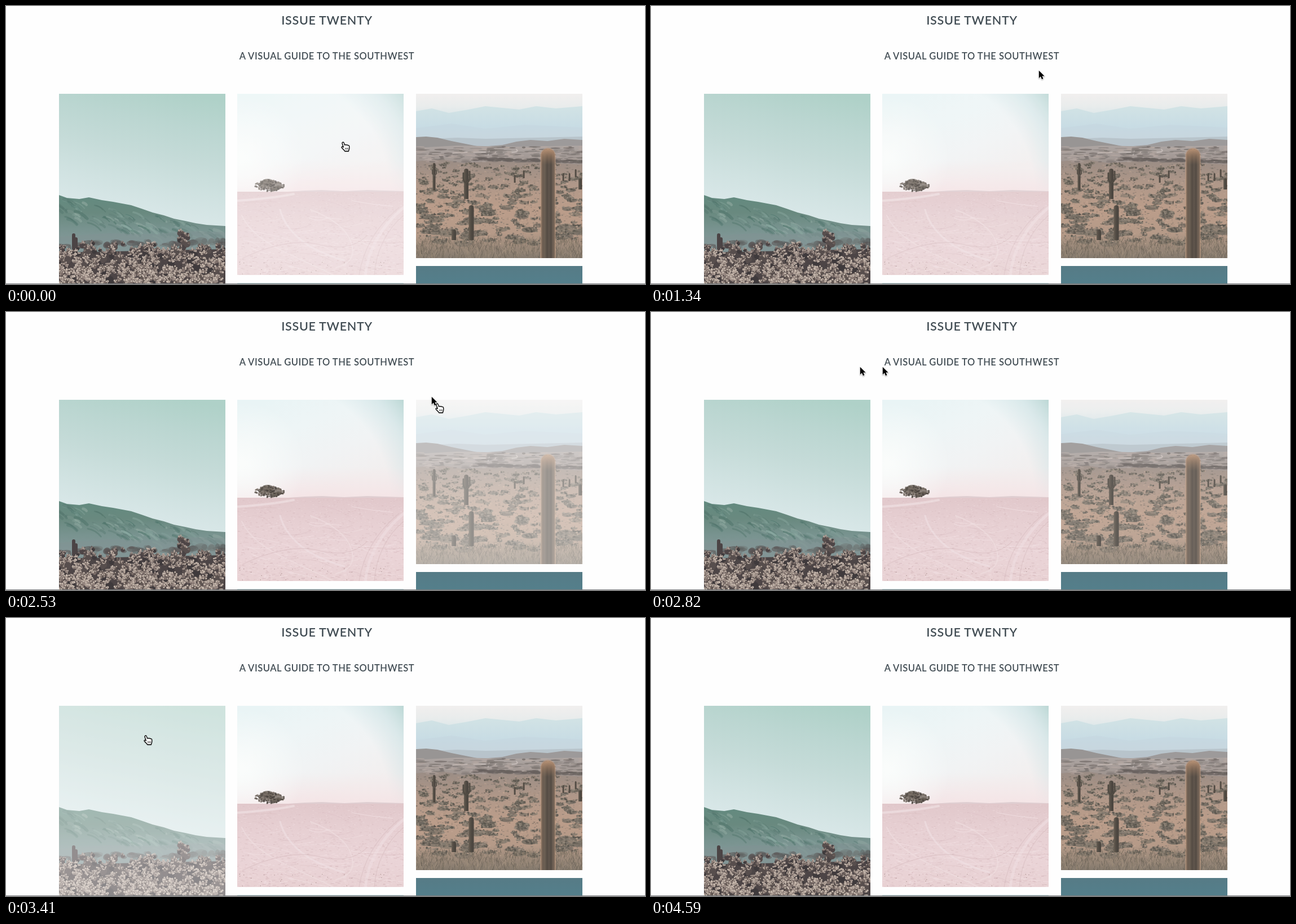
An HTML page with a canvas that plays this animation: 1133x494 px, repeating every 5.25 s.

```html
<!DOCTYPE html>
<html lang="en">
<head>
<meta charset="utf-8">
<title>Issue Twenty</title>
<style>
html, body { margin: 0; width: 100%; height: 100%; overflow: hidden; background: #fefefe; }
canvas { position: absolute; left: 0; top: 0; display: block; width: 100%; height: 100%; }
h1, h2 {
  position: absolute; left: 5px; right: 0; margin: 0; text-align: center; white-space: nowrap;
  font-family: Lato, "Open Sans", sans-serif; font-weight: 600; color: #424d54;
}
h1 { top: 11px; font-size: 21.5px; line-height: 28px; letter-spacing: .7px; }
h2 { top: 78px; font-size: 16.5px; line-height: 23px; letter-spacing: .52px; }
</style>
</head>
<body>
<h1>ISSUE TWENTY</h1>
<h2>A VISUAL GUIDE TO THE SOUTHWEST</h2>
<canvas id="stage" width="1133" height="494"></canvas>
<script>
const LOOP = 5250;
const stage = document.getElementById('stage').getContext('2d');

function seeded(seed) {
  return () => {
    seed = (seed + 0x6D2B79F5) | 0;
    let v = Math.imul(seed ^ (seed >>> 15), 1 | seed);
    v = (v + Math.imul(v ^ (v >>> 7), 61 | v)) ^ v;
    return ((v ^ (v >>> 14)) >>> 0) / 4294967296;
  };
}

// Scenes are painted once, in stage coordinates.
function scene(x, y, w, h, paint, seed) {
  const cv = document.createElement('canvas');
  cv.width = w;
  cv.height = h;
  const c = cv.getContext('2d');
  c.translate(-x, -y);
  c.lineCap = 'round';
  c.lineJoin = 'round';
  paint(c, seeded(seed), x, y, w, h);
  return { cv, x, y };
}

function shade(c, x0, y0, x1, y1, ...colors) {
  const g = c.createLinearGradient(x0, y0, x1, y1);
  colors.forEach((col, i) => g.addColorStop(i / (colors.length - 1), col));
  return g;
}

function glow(c, x, y, r0, r1, ...colors) {
  const g = c.createRadialGradient(x, y, r0, x, y, r1);
  colors.forEach((col, i) => g.addColorStop(i / (colors.length - 1), col));
  return g;
}

function land(c, pts, bottom, fill) {
  c.beginPath();
  c.moveTo(pts[0], bottom);
  for (let i = 0; i < pts.length; i += 2) c.lineTo(pts[i], pts[i + 1]);
  c.lineTo(pts[pts.length - 2], bottom);
  c.fillStyle = fill;
  c.fill();
}

function line(c, path, color, width) {
  c.strokeStyle = color;
  c.lineWidth = width;
  c.stroke(new Path2D(path));
}

function blob(c, x, y, rx, ry, color) {
  c.fillStyle = color;
  c.beginPath();
  c.ellipse(x, y, rx, ry, 0, 0, 7);
  c.fill();
}

function pick(rnd, list) { return list[Math.floor(rnd() * list.length)]; }

// A bristly clump: dark heart, short pale arms.
function cholla(c, rnd, x, y, r) {
  blob(c, x, y + r * .6, r * 1.1, r, pick(rnd, ['#3f3a3c', '#4d4546', '#574e4d']));
  for (let i = 0; i < 7; i++) {
    const a = -Math.PI * (rnd() * 1.2 - .1), d = r * (.5 + rnd() * .6);
    const px = Math.cos(a) * d, py = Math.sin(a) * d;
    const color = pick(rnd, ['#615652', '#7d6f6a', '#968780', '#b3a49a']);
    line(c, `M${x + px * .55} ${y + py * .55}L${x + px} ${y + py}`, color, Math.max(1, r * .38));
    if (r > 6) blob(c, x + px, y + py, r * .13, r * .13, '#cbbeb2');
  }
}

function chollaField(c, rnd, x, y, w, h) {
  c.fillStyle = shade(c, 320, 156, 275, 385, '#afd1c8', '#bbd6d1', '#c5dbd8', '#d0e2e1', '#dae8e9');
  c.fillRect(x, y, w, h);
  land(c, [94, 336, 108, 341, 130, 343, 147, 340, 170, 345, 190, 348, 206, 351, 222, 354, 240, 360,
    260, 367, 280, 372, 298, 378, 318, 382, 336, 386, 356, 389, 389, 391], 440,
  shade(c, 0, 338, 0, 425, '#638a7f', '#69897f', '#78938f', '#86999a'));
  c.save();
  c.clip(new Path2D('M94 338 147 342 206 353 240 362 298 380 356 391 389 393V425H94Z'));
  for (let i = 0; i < 110; i++) {
    const px = 84 + rnd() * 290, py = 340 + Math.max(0, px - 94) * .19 + rnd() * 38;
    const l = 6 + rnd() * 18;
    c.globalAlpha = .2 + rnd() * .25;
    line(c, `M${px} ${py}q${l * .6} ${l * .1} ${l} ${l * .6}`, pick(rnd, ['#456d63', '#4f7169', '#8fada4', '#a0b5ad']), 1.5 + rnd() * 4);
  }
  c.restore();
  land(c, [94, 410, 180, 404, 260, 406, 320, 400, 389, 402], 440, 'rgba(128,147,147,.6)');
  for (let i = 0; i < 70; i++) {
    const px = x + rnd() * w;
    c.globalAlpha = .5;
    blob(c, px, 421 - (px - 94) * .02 + rnd() * 9, 3 + rnd() * 8, 2 + rnd() * 4, pick(rnd, ['#5c605f', '#6f7775', '#554e4e']));
  }
  c.globalAlpha = 1;
  land(c, [94, 438, 389, 432], 493, '#4c4546');
  for (let i = 0; i < 330; i++) {
    const k = i / 330;
    cholla(c, rnd, x + rnd() * w, 419 + k * 76 + rnd() * 9, 2.5 + k * 7 + rnd() * 3.5);
    if (i === 90) {
      line(c, 'M120 407v24M124 414v13M315 404v28M309 408l4 10M322 406l-5 10', '#4b4445', 6);
      for (let j = 0; j < 6; j++) cholla(c, rnd, 315 + (j % 3 - 1) * 6, 401 + j * 4, 5);
    }
  }
}

function pinkFlat(c, rnd, x, y, w, h) {
  c.fillStyle = shade(c, 470, 156, 540, 330, '#e9f4f5', '#eef5f6', '#f1f3f4', '#f2efef');
  c.fillRect(x, y, w, 175);
  c.fillStyle = glow(c, 480, 330, 200, 292, 'rgba(205,226,228,0)', 'rgba(205,226,228,.6)', '#b4d3cf');
  c.fillRect(x, y, w, 175);
  c.fillStyle = shade(c, 0, 275, 0, 330, 'rgba(246,228,229,0)', 'rgba(245,226,228,.8)');
  c.fillRect(x, 275, w, 56);
  c.fillStyle = glow(c, 420, 270, 5, 110, '#fafcfb', 'rgba(250,252,251,0)');
  c.fillRect(x, 156, 125, 175);
  land(c, [500, 330, 530, 328, 560, 327, 600, 329, 640, 327, 705, 329], 332, '#dfced1');
  c.fillStyle = shade(c, 0, 330, 0, 478, '#e1c8cb', '#e7d0d3', '#ead4d7', '#e8d1d3');
  c.fillRect(x, 330, w, 148);
  for (let i = 0; i < 1900; i++) {
    const k = rnd(), l = 1 + rnd() * (2 + 4 * k);
    c.globalAlpha = .25 + rnd() * .4;
    c.fillStyle = pick(rnd, ['#d0b2b6', '#d9bfc2', '#f1e1e3', '#f0dcdf']);
    c.fillRect(x + rnd() * w, 331 + 147 * k, l, .7 + k * .8);
  }
  for (let i = 0; i < 34; i++) {
    const px = x + rnd() * w, py = 345 + rnd() * 120, l = 25 + rnd() * 55;
    c.globalAlpha = .3 + rnd() * .25;
    line(c, `M${px} ${py}q${l * .5} ${rnd() * 12 - 3} ${l} ${rnd() * 26 - 8}`, pick(rnd, ['#f3e4e6', '#d9bdc1']), 1.2);
  }
  c.globalAlpha = .6;
  line(c, 'M410 346Q470 342 510 334', '#f2e5e6', 4);
  line(c, 'M486 362Q494 392 522 415T600 452', '#f1e2e4', 3);
  line(c, 'M637 478C643 430 667 390 705 358', '#f1e0e3', 5);
  line(c, 'M653 478C656 436 674 398 705 372M626 478C634 432 654 394 697 358', '#d8bcc0', 1.2);
  line(c, 'M418 372Q435 410 500 440T580 478M540 362Q600 385 612 420T585 465', '#f0dfe2', 2);
  line(c, 'M420 448Q500 410 555 424T640 408', '#d9bec1', 1.3);
  c.globalAlpha = 1;
  for (let i = 0; i < 26; i++) blob(c, x + rnd() * w, 455 + rnd() * 22, .8, .6, '#a98f8e');
  line(c, 'M463 330l3-9M470 330v-8M475 328l3-6', '#5f554f', 1.6);
  c.globalAlpha = .75;
  blob(c, 468, 318, 21, 8, '#6a6057');
  blob(c, 464, 313, 11, 6, '#6a6057');
  for (let i = 0; i < 150; i++) {
    const a = rnd() * 7, r = Math.sqrt(rnd());
    blob(c, 467 + Math.cos(a) * r * 26, 319 + Math.sin(a) * r * 10, 1.8, 1.3, pick(rnd, ['#57504a', '#6b6158', '#80766d', '#48423d']));
  }
  c.globalAlpha = 1;
}

function column(x, top, bottom, w) {
  const r = w / 2;
  return new Path2D(`M${x - r} ${bottom}V${top + r}A${r} ${r} 0 0 1 ${x + r} ${top + r}V${bottom}Z`);
}

function trunk(c, x, top, bottom, w) {
  c.fillStyle = shade(c, x - w / 2, 0, x + w / 2, 0, '#685e53', '#4f4942', '#4a443e');
  c.fill(column(x, top, bottom, w));
}

function shrub(c, rnd, x, y, r) {
  blob(c, x, y, r, r * .36, pick(rnd, ['#69645c', '#756e64', '#7f766b']));
  for (let i = 0; i < 4 + r; i++) {
    const px = x + (rnd() * 2 - 1) * r, py = y - (rnd() - .35) * r * .7;
    blob(c, px, py, 1 + rnd() * r * .15, .8 + rnd(), pick(rnd, ['#56524b', '#645f56', '#857c70', '#9a8d7f']));
  }
}

function saguaroValley(c, rnd, x, y, w, h) {
  c.fillStyle = shade(c, 0, 156, 0, 245, '#f1efee', '#e9ecec', '#d6e5e8', '#cbdde6', '#ccd9df');
  c.fillRect(x, y, w, h);
  land(c, [727, 187, 755, 182, 785, 190, 820, 184, 850, 178, 880, 181, 910, 184, 940, 178, 975, 182, 1022, 178], 250,
    shade(c, 0, 178, 0, 250, '#d2e3e5', '#c8dce4', '#cbd5da'));
  land(c, [727, 217, 790, 209, 850, 218, 920, 211, 1022, 216], 255, 'rgba(198,214,223,.5)');
  land(c, [727, 237, 800, 234, 850, 236, 1022, 232], 260, 'rgba(178,189,195,.7)');
  land(c, [727, 233, 745, 232, 765, 234, 790, 240, 815, 245, 845, 251], 275, '#989594');
  land(c, [830, 251, 880, 247, 905, 241, 930, 238, 960, 240, 990, 236, 1022, 238], 275, '#9d9a9a');
  land(c, [727, 252, 800, 248, 900, 250, 1022, 248], 300, shade(c, 0, 250, 0, 285, '#aca4a1', '#9b908b'));
  line(c, 'M770 266Q800 258 858 260T905 255', '#c5bcb8', 2);
  line(c, 'M857 257l-2 7', '#e1d9d5', 2);
  land(c, [727, 276, 770, 272, 810, 279, 860, 276, 940, 277, 1022, 282], 448,
    shade(c, 0, 275, 0, 447, '#9b8d85', '#b09889', '#bb9d8a', '#b59a88', '#857a6e'));
  for (let i = 0; i < 190; i++) {
    const px = x + rnd() * w;
    c.globalAlpha = .4 + rnd() * .4;
    blob(c, px, 250 + rnd() * 27, 3 + rnd() * 9, .8 + rnd(), pick(rnd, ['#827b77', '#736c69', '#b5a8a2']));
    if (px > 830) blob(c, px, 269 + (px - 830) * .025 + rnd() * 5, 6, 1.5, '#69625f');
  }
  for (let i = 0; i < 260; i++) {
    const k = i / 260, px = x + rnd() * w;
    c.globalAlpha = .6 + rnd() * .3;
    shrub(c, rnd, px, 278 + k * 140 + rnd() * 5, 3 + rnd() * (3 + k * 12));
  }
  for (let i = 0; i < 1300; i++) {
    c.fillStyle = pick(rnd, ['#5f5a52', '#77706a', '#caab97', '#a48c7d']);
    c.globalAlpha = .5;
    c.fillRect(x + rnd() * w, 280 + 142 * rnd(), 1 + rnd() * 3, 1 + rnd());
  }
  for (let i = 0; i < 1100; i++) {
    const px = x + rnd() * w, py = 417 + rnd() * 34;
    c.globalAlpha = .5;
    line(c, `M${px} ${py}l${rnd() * 8 - 4} ${-3 - rnd() * 7}`, pick(rnd, ['#5f594f', '#70685d', '#8d806f', '#a89581']), 1);
  }
  c.globalAlpha = 1;
  trunk(c, 816, 289, 343, 8);
  line(c, 'M811 297v10q1 6 5 7M822 294v13q-1 6-6 7', '#514b43', 3);
  trunk(c, 759, 279, 328, 5);
  line(c, 'M756 291v7l3 3M763 292v6l-4 4', '#5b544c', 2);
  trunk(c, 825, 354, 416, 9);
  trunk(c, 794, 397, 416, 8);
  for (const [px, top] of [[902, 300], [918, 292], [988, 297], [999, 297], [1010, 290]]) trunk(c, px, top, top + 14, 3);
  trunk(c, 1018, 306, 326, 6);

  c.fillStyle = 'rgba(186,150,124,.7)';
  c.fill(column(961, 252, 450, 27));
  const body = column(961, 254, 450, 24);
  c.fillStyle = shade(c, 949, 0, 973, 0, '#85705f', '#665b50', '#584f47', '#5a5149', '#7d6a5b');
  c.fill(body);
  c.globalAlpha = .4;
  for (let i = 0; i < 6; i++) line(c, `M${952 + i * 3.6} 264V450`, i % 2 ? '#7d6e60' : '#463f38', 1);
  c.globalAlpha = 1;
  c.fillStyle = shade(c, 0, 253, 0, 282, '#bd9678', 'rgba(166,130,103,.5)', 'rgba(150,120,95,0)');
  c.fill(body);
}

function seaTop(c, rnd, x, y, w, h) {
  c.fillStyle = shade(c, 0, y, 0, y + h, '#567b86', '#547f8b');
  c.fillRect(x, y, w, h);
}

// Each hover dims its card over 400 ms and restores it as quickly.
const cards = [
  { art: scene(94, 156, 295, 337, chollaField, 11), over: 2980, out: 4160 },
  { art: scene(410, 156, 295, 322, pinkFlat, 23), over: -260, out: 1050 },
  { art: scene(727, 156, 295, 292, saguaroValley, 37), over: 1640, out: 2530 },
  { art: scene(727, 462, 295, 31, seaTop, 5), over: LOOP, out: LOOP }
];
const ramp = v => Math.min(1, Math.max(0, v / 400));
const opacity = (card, t) => 1 - .4 * (ramp(t - card.over) - ramp(t - card.out));

// Pointer poses: time, then shape and top left corner; fast moves leave two.
const poses = [
  [0, 'hand', 594, 241], [890, 'hand', 594, 237], [1040, 'hand', 619, 194],
  [1190, 'arrow', 657, 137], [1340, 'arrow', 687, 114],
  [1490, 'arrow', 722, 114, 'arrow', 740, 120],
  [1630, 'arrow', 757, 153, 'hand', 770, 168],
  [1780, 'hand', 784, 216, 'hand', 784, 233],
  [1930, 'hand', 790, 258], [2080, 'hand', 790, 258], [2380, 'hand', 790, 257],
  [2530, 'arrow', 754, 150, 'hand', 761, 162],
  [2670, 'arrow', 613, 103], [2820, 'arrow', 370, 97, 'arrow', 410, 97],
  [2970, 'arrow', 263, 129], [3120, 'hand', 247, 188], [3260, 'hand', 244, 205], [3410, 'hand', 244, 208],
  [4160, 'hand', 258, 164], [4300, 'arrow', 428, 67], [4450, 'arrow', 1038, 88], [4590]
];
// The picture holds between these moments.
const ticks = [150, ...poses.map(p => p[0])];

const arrow = new Path2D('M.8.8V14.2L3.9 11.3 6 16.2 8.5 15.1 6.4 10.4H10.6Z');
const hand = new Path2D('M2 2.7C2 .6 4.8.4 5.3 2.4L6.5 6.2C7.2 5 8.6 5.2 9.1 6.2 10 5.3 11.4 5.6 11.9 6.7 13.3 6.1 14.7 7 14.7 8.6V12C14.5 13.9 13.6 15 13.4 17H6.8C5.8 15 2.8 12.7 1.2 10.6.4 9.2 2.5 8.2 4.3 10Z');
const knuckles = new Path2D('M7.8 11v3.2M10 11v3.2M12.1 11v3.2');

function pointer(kind, x, y) {
  const c = stage;
  c.save();
  c.translate(x, y);
  c.lineJoin = 'round';
  c.shadowColor = 'rgba(0,0,0,.35)';
  c.shadowBlur = 2;
  c.shadowOffsetY = 1;
  c.fillStyle = c.strokeStyle = '#fff';
  c.lineWidth = 1.6;
  if (kind === 'arrow') {
    c.stroke(arrow);
    c.shadowColor = 'transparent';
    c.fillStyle = '#000';
    c.fill(arrow);
  } else {
    c.fill(hand);
    c.shadowColor = 'transparent';
    c.strokeStyle = '#000';
    c.lineWidth = 1.3;
    c.stroke(hand);
    c.lineWidth = .8;
    c.stroke(knuckles);
  }
  c.restore();
}

function draw(now) {
  const t = now % LOOP;
  const tick = Math.max(...ticks.filter(v => v <= t));
  const shapes = poses.filter(p => p[0] <= t).pop().slice(1);
  stage.clearRect(0, 0, 1133, 494);
  for (const card of cards) {
    stage.globalAlpha = opacity(card, tick);
    stage.drawImage(card.art.cv, card.art.x, card.art.y);
  }
  stage.globalAlpha = 1;
  stage.fillStyle = '#c5dde1';
  stage.fillRect(410, 492, 295, 1);
  stage.fillStyle = '#7b7e80';
  stage.fillRect(0, 493, 1133, 1);
  for (let i = 0; i < shapes.length; i += 3) pointer(shapes[i], shapes[i + 1], shapes[i + 2]);
}

const start = performance.now();
function frame() {
  draw(performance.now() - start);
  requestAnimationFrame(frame);
}
frame();
</script>
</body>
</html>
```
